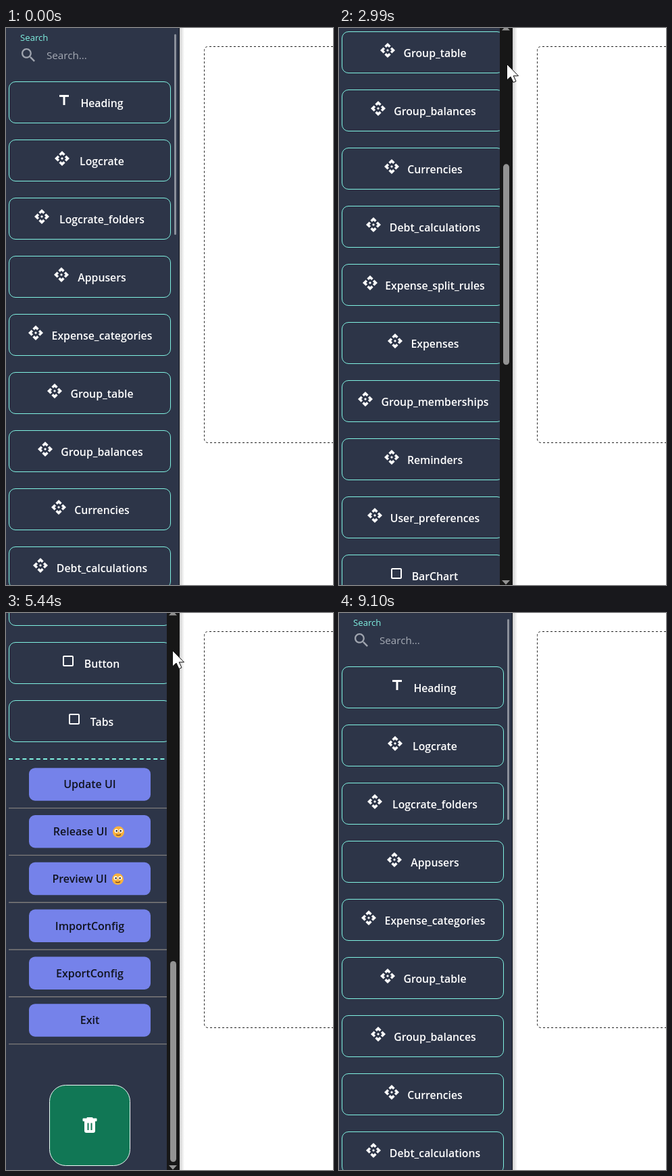
Recreate the animation shown at these times as an HTML page. Size 484 by 824 pixels, loop 9.5 s.

```html
<!DOCTYPE html>
<html lang="en">
<head>
<meta charset="utf-8">
<title>Component panel</title>
<style>
  html, body { margin: 0; width: 100%; height: 100%; overflow: hidden; background: #fff; }
  svg { display: block; width: 484px; height: 824px; }
  text { font: 600 15.8px "Open Sans", "Noto Sans", sans-serif; text-anchor: middle; fill: #fff; }
  .hint { font-weight: 400; text-anchor: start; }
  .card { fill: none; stroke: #80f2e2; }
  .button { fill: #7582ea; }
  .dark { font-size: 16px; fill: #10131f; }
  .rule { stroke: #7d7b7a; stroke-width: 1.4; }
</style>
</head>
<body>
<svg viewBox="0 0 484 824">
  <defs>
    <linearGradient id="shade">
      <stop offset="0" stop-color="#cfcfcf"/>
      <stop offset="1" stop-color="#fff"/>
    </linearGradient>
    <path id="api" d="m14 12-2 2-2-2 2-2 2 2zm-2-6 2.12 2.12 2.5-2.5L12 1 7.38 5.62l2.5 2.5L12 6zm-6 6 2.12-2.12-2.5-2.5L1 12l4.62 4.62 2.5-2.5L6 12zm12 0-2.12 2.12 2.5 2.5L23 12l-4.62-4.62-2.5 2.5L18 12zm-6 6-2.12-2.12-2.5 2.5L12 23l4.62-4.62-2.5-2.5L12 18z"/>
    <path id="title" d="M5 4v3h5.5v12h3V7H19V4z"/>
    <path id="square" d="M18 4H6c-1.1 0-2 .9-2 2v12c0 1.1.9 2 2 2h12c1.1 0 2-.9 2-2V6c0-1.1-.9-2-2-2zm0 14H6V6h12v12z"/>
    <g id="face">
      <circle r="8.5" fill="#f9b23c"/>
      <circle cx="-3.2" cy="-1.8" r="2.8" fill="#fff"/>
      <circle cx="3.4" cy="-1.8" r="2.8" fill="#fff"/>
      <circle cx="-2.8" cy="-1.6" r="1.3" fill="#3a2a20"/>
      <circle cx="3.2" cy="-1.6" r="1.3" fill="#3a2a20"/>
      <path d="M-3.5 4Q0 6 3.5 3.6" fill="none" stroke="#6b3d1c" stroke-width="1.3"/>
    </g>
  </defs>

  <rect x="257" width="7" height="824" fill="url(#shade)"/>
  <path d="M490 27.5H299.500Q293.500 27.500 293.500 33.500V607.500Q293.500 613.500 299.500 613.500H490" fill="none" stroke="#222" stroke-dasharray="3 3"/>
  <rect width="257" height="824" fill="#2d3548"/>
  <rect x="256" width="1" height="824" fill="#14171f"/>

  <g id="list">
    <text class="hint" x="21" y="18.500" style="font-size:13.2px;fill:#80f2e2">Search</text>
    <path transform="translate(19.600 26.600) scale(1.14)" fill="#a0a5af" d="M15.500 14h-.79l-.28-.27C15.410 12.590 16 11.110 16 9.500 16 5.910 13.090 3 9.500 3S3 5.910 3 9.500 5.910 16 9.500 16c1.610 0 3.090-.59 4.230-1.570l.27.28v.79l5 4.990L20.490 19l-4.990-5zm-6 0C7.010 14 5 11.990 5 9.500S7.010 5 9.500 5 14 7.010 14 9.500 11.990 14 9.500 14z"/>
    <text class="hint" x="60" y="46" style="font-size:15.2px;fill:#a6abb5">Search...</text>
    <g id="cards"></g>
    <path d="M4 1542H244" stroke="#80f2e2" stroke-width="2" stroke-dasharray="6 4.200"/>
    <g id="buttons"></g>
    <g transform="translate(64 2024)">
      <rect x=".5" y=".5" width="119" height="119" rx="24" fill="#117755" stroke="#eefbf6"/>
      <path d="M56 50V48.500H64V50H70V53.500H50V50Z" fill="#fff" stroke="#fff" stroke-linejoin="round"/>
      <path d="M52 54H68V68Q68 71 65 71H55Q52 71 52 68Z" fill="#fff"/>
      <path d="M57.500 56.500V67M62.500 56.500V67" stroke="#117755" stroke-width="2"/>
    </g>
  </g>

  <g id="track">
    <rect x="238" width="19" height="824" fill="#171717"/>
    <path d="M241 3.500L247-3L253 3.500ZM241 817H253L247 823.500Z" fill="#939393"/>
  </g>
  <rect id="thumb" height="297"/>
  <path id="cursor" d="M.5.5V24L6 19L10 27.500L14 25.800L10.200 17.800H17.500Z" fill="#fff" stroke="#111" stroke-linejoin="round"/>
</svg>

<script>
const $ = id => document.getElementById(id);
const LOOP = 9500;

// label, left edge of the label
const cards = [
  ['Heading', 110], ['Logcrate', 107], ['Logcrate_folders', 77], ['Appusers', 106],
  ['Expense_categories', 68], ['Group_table', 96], ['Group_balances', 82],
  ['Currencies', 102], ['Debt_calculations', 75], ['Expense_split_rules', 70],
  ['Expenses', 107], ['Group_memberships', 63], ['Reminders', 102],
  ['User_preferences', 77], ['BarChart', 109], ['Button', 116], ['Tabs', 125]
];
const buttons = ['Update UI', 'Release UI', 'Preview UI', 'ImportConfig', 'ExportConfig', 'Exit'];

$('cards').innerHTML = cards.map(([label, left], i) => {
  const y = 79 + 86 * i;
  const icon = i === 0 ? 'title' : i > 13 ? 'square' : 'api';
  return `<rect class="card" x="4.5" y="${y + .5}" width="239" height="61" rx="9.5"/>
    <use href="#${icon}" x="${left - 36}" y="${y + 16}" fill="#fff"/>
    <text x="142" y="${y + 37.5}">${label}</text>`;
}).join('');

$('buttons').innerHTML = buttons.map((label, i) => {
  const y = 1555.2 + 69.8 * i;
  const face = i === 1 || i === 2;
  const x = face ? 109 + i % 2 : 124;
  return `<rect class="button" x="34" y="${y}" width="180" height="48.500" rx="9"/>
    <text class="dark" x="${x}" y="${y + 30.2}">${label}</text>
    ${face ? `<use href="#face" x="${x + 56.5}" y="${y + 25}"/>` : ''}
    <path class="rule" d="M4 ${y + 59.4}H244"/>`;
}).join('');

// start, end, number of steps, scroll offset reached
const scrolls = [
  [1690, 2300, 9, 252], [2620, 2990, 6, 504], [3100, 3310, 4, 756],
  [3560, 3790, 4, 882], [3960, 4170, 4, 1008], [4430, 4640, 4, 1134],
  [4840, 5050, 4, 1260], [5240, 5440, 4, 1326],
  [6680, 7370, 11, 760], [7560, 7840, 5, 380], [8020, 8280, 4, 0]
];

const smooth = p => p * p * (3 - 2 * p);
const clamp = p => Math.min(1, Math.max(0, p));
const mix = (a, b, p) => a + (b - a) * p;

// progress of a move that is shown in n discrete steps
function stepped(t, from, to, n) {
  if (t < from) return 0;
  if (t >= to) return 1;
  const k = Math.floor((t - from) / (to - from) * (n - 1) + 1e-6);
  return (k + .3) / (n - .7);
}

function scrollAt(t) {
  let pos = 0;
  for (const [from, to, n, goal] of scrolls) {
    if (t < from) break;
    pos = mix(pos, goal, smooth(stepped(t, from, to, n)));
  }
  return Math.round(pos);
}

function cursorAt(t) {
  if (t < 140 || t >= 9000) return null;
  if (t < 610) {
    const p = clamp(Math.floor((t - 140) / 67) / 7);
    const q = 1 - (1 - p) ** 2;
    return [mix(353, 253, q), mix(22, 55, q)];
  }
  if (t < 960) return [253, 55];
  if (t < 1160) return [251, 55];
  if (t < 3100) return [248, 53];
  if (t < 8730) return [246, 55];
  const p = (Math.floor((t - 8730) / 70) + 1) / 4;
  return [mix(246, 419, p), mix(55, 25, p)];
}

function draw(t) {
  const pos = scrollAt(t);
  $('list').setAttribute('transform', `translate(0 ${-pos})`);

  const open = clamp((t - 400) / 140) * (1 - clamp((t - 8960) / 140));
  $('track').setAttribute('opacity', open);
  const width = mix(3, 9, open);
  const thumb = $('thumb');
  thumb.setAttribute('x', 252 - width);
  thumb.setAttribute('y', 9 + pos * 506 / 1326);
  thumb.setAttribute('width', width);
  thumb.setAttribute('rx', width / 2);
  thumb.setAttribute('fill', open > .5 ? '#939393' : '#8b909a');

  const at = cursorAt(t);
  $('cursor').setAttribute('visibility', at ? 'visible' : 'hidden');
  if (at) $('cursor').setAttribute('transform', `translate(${at.map(Math.round)})`);
}

function tick() {
  draw(performance.now() % LOOP);
  requestAnimationFrame(tick);
}
tick();
</script>
</body>
</html>
```
